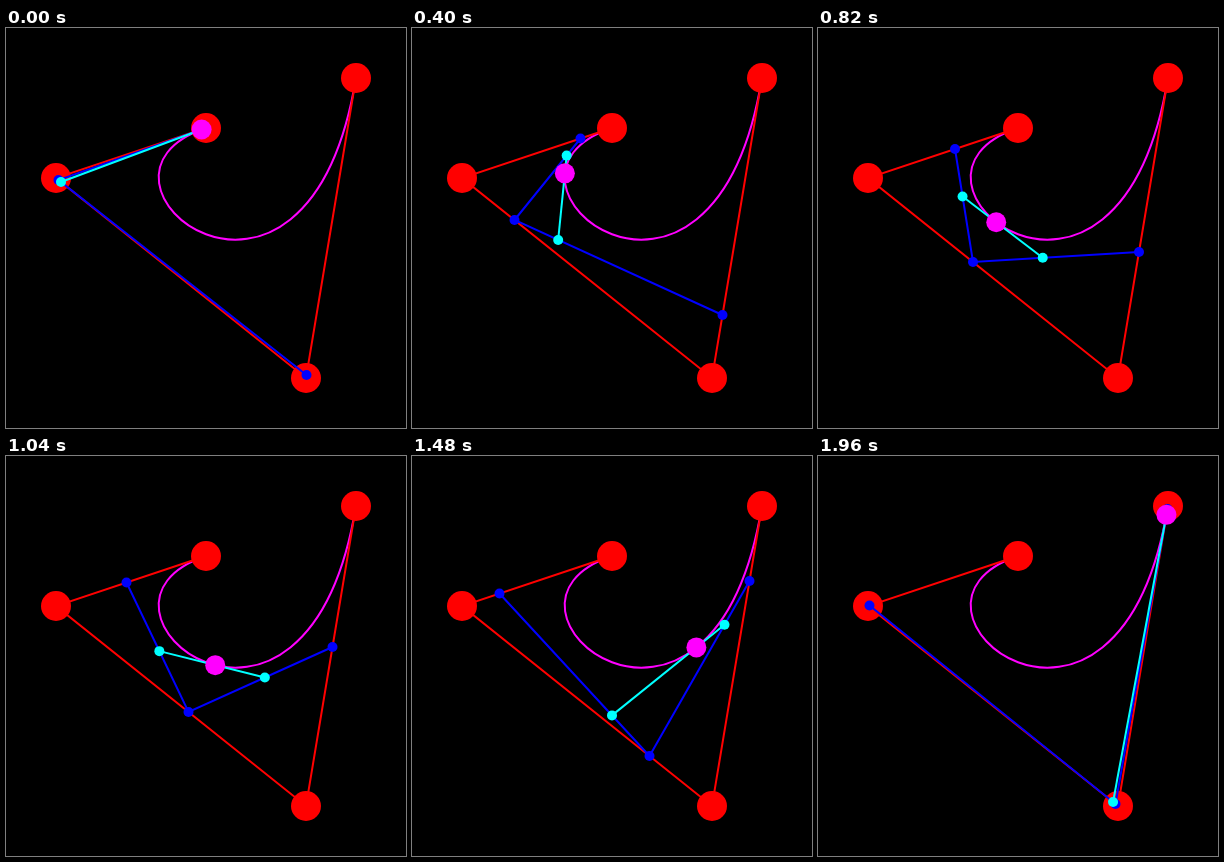
Recreate the animation shown at these times as an HTML page with a canvas. Size 400 by 400 pixels, loop 1.98 s.

```html
<!DOCTYPE html>
<html>
<head>
<meta charset="utf-8">
<title>Cubic curve construction</title>
<style>
html, body { margin: 0; width: 100%; height: 100%; overflow: hidden; background: #000; }
canvas { display: block; width: 400px; height: 400px; }
</style>
</head>
<body>
<canvas id="stage" width="400" height="400"></canvas>
<script>
const ctx = document.getElementById('stage').getContext('2d');
const STEP = 20, STEPS = 99;
const control = [[200, 100], [50, 150], [300, 350], [350, 50]];
const levels = [
  { color: '#f00', radius: 15 },
  { color: '#00f', radius: 5 },
  { color: '#0ff', radius: 5 },
  { color: '#f0f', radius: 10 }
];

// One round of de Casteljau interpolation
function reduce(points, t) {
  return points.slice(1).map((p, i) =>
    p.map((v, k) => points[i][k] + (v - points[i][k]) * t));
}

function drawCurve() {
  ctx.strokeStyle = '#f0f';
  ctx.beginPath();
  ctx.moveTo(...control[0]);
  ctx.bezierCurveTo(...control.slice(1).flat());
  ctx.stroke();
}

function drawLevel(points, { color, radius }) {
  ctx.strokeStyle = ctx.fillStyle = color;
  ctx.beginPath();
  points.forEach(p => ctx.lineTo(...p));
  ctx.stroke();
  for (const [x, y] of points) {
    ctx.beginPath();
    ctx.arc(x, y, radius, 0, Math.PI * 2);
    ctx.fill();
  }
}

function draw(t) {
  ctx.fillStyle = '#000';
  ctx.fillRect(0, 0, 400, 400);
  ctx.lineWidth = 2;
  drawCurve();
  let points = control;
  for (const level of levels) {
    drawLevel(points, level);
    points = reduce(points, t);
  }
}

function tick() {
  const step = Math.floor(performance.now() / STEP) % STEPS;
  draw((step + 1) / 100);
  requestAnimationFrame(tick);
}
tick();
</script>
</body>
</html>
```
